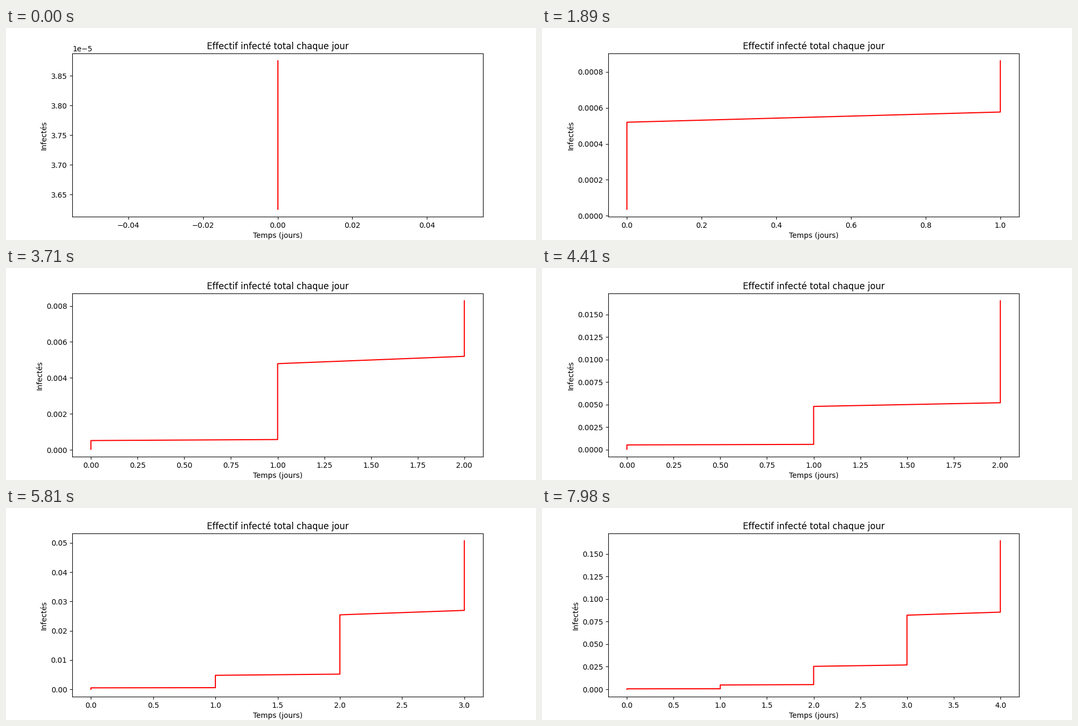
A matplotlib script that plays this animation: 1000x400 px, repeating every 8 s.

```python
import numpy as np
import matplotlib.pyplot as plt
from matplotlib.animation import FuncAnimation

LOOP_MS = 8000
TICK_MS = 40          # animation tick
STEP_MS = 70          # one simulated hour
HOURS = 116

# hour, infected share, hourly growth rate
KNOTS = np.array([
    (0, 3.625e-5, 0.060),
    (1, 3.875e-5, 0.090),
    (23, 5.2e-4, 0.1045),
    (28, 8.61e-4, 0.0995),
    (44, 3.735e-3, 0.0835),
    (48, 5.2e-3, 0.081),
    (64, 1.651e-2, 0.064),
    (72, 2.695e-2, 0.0575),
    (84, 5.067e-2, 0.048),
    (96, 8.55e-2, 0.040),
    (98, 9.245e-2, 0.0385),
    (115, 0.16447, 0.029),
])


def infected(hour):
    """Cubic Hermite curve through the logarithms of the knots."""
    t, y, rate = KNOTS.T
    y = np.log(y)
    i = np.clip(np.searchsorted(t, hour, side="right") - 1, 0, len(t) - 2)
    width = t[i + 1] - t[i]
    u = (hour - t[i]) / width
    rise = u * u * (3 - 2 * u)
    bend = u * (1 - u) * ((1 - u) * rate[i] - u * rate[i + 1])
    return np.exp(y[i] + (y[i + 1] - y[i]) * rise + width * bend)


hours = np.arange(HOURS)
days = hours // 24
curve = infected(hours)

fig, ax = plt.subplots(figsize=(10, 4), dpi=100)
line, = ax.plot([], [], color="red")
ax.set_title("Effectif infecté total chaque jour")
ax.set_xlabel("Temps (jours)")
ax.set_ylabel("Infectés")


def update(tick):
    step = (tick * TICK_MS + 30) // STEP_MS
    count = min(step + 2, HOURS)
    line.set_data(days[:count], curve[:count])
    ax.relim()
    ax.autoscale_view()
    return line,


anim = FuncAnimation(fig, update, frames=LOOP_MS // TICK_MS,
                     interval=TICK_MS, repeat=True, repeat_delay=0)
plt.show()
```
